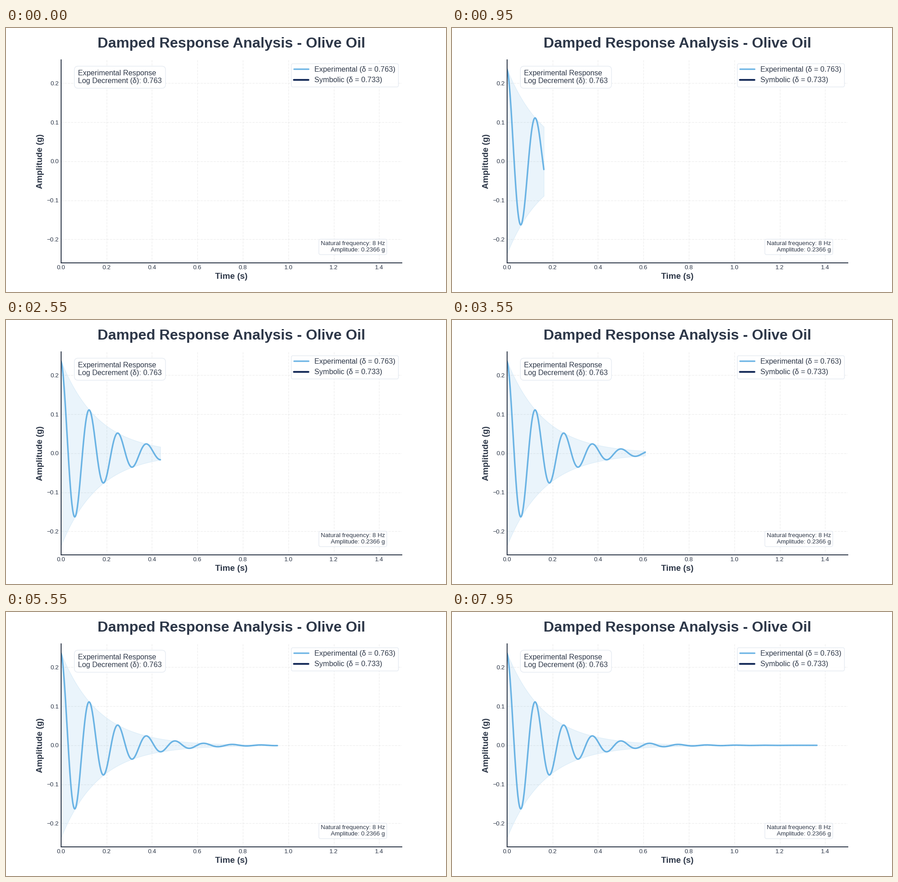
Animation, 966 px wide and 580 px high, one loop 8000 ms. Source, as a matplotlib script:

```python
import numpy as np
import matplotlib.pyplot as plt
from matplotlib.animation import FuncAnimation

W, H, DPI = 966, 580, 100
FRAMES, STEPS, INTERVAL = 160, 175, 50

INK, BORDER = "#2d3748", "#e2e8f0"
SKY, NAVY = "#3498db", "#1a2f5c"
AMP, FREQ, DEC, T_END, N = 0.2366, 8, 0.763, 1.5, 1000


def pt(size):
    """Points on a 10 inch wide layout."""
    return size * W / (10 * DPI)


plt.rcParams.update({
    "font.family": "Liberation Sans",
    "text.color": INK,
    "axes.labelcolor": INK,
    "axes.edgecolor": INK,
    "axes.linewidth": pt(1.5),
    "axes.axisbelow": True,
    "axes.labelpad": pt(4),
    "xtick.color": INK,
    "ytick.color": INK,
    "lines.solid_capstyle": "round",
    "patch.linewidth": pt(1),
})

# Damped oscillation from its logarithmic decrement
zeta = DEC / np.hypot(2 * np.pi, DEC)
wn = 2 * np.pi * FREQ
t = np.linspace(0, T_END, N)
env = AMP * np.exp(-zeta * wn * t)
wave = env * np.cos(wn * np.sqrt(1 - zeta ** 2) * t)

fig, ax = plt.subplots(figsize=(W / DPI, H / DPI), dpi=DPI, facecolor="white")
fig.subplots_adjust(left=0.125, right=0.9, bottom=0.11, top=0.88)
ax.set_xlim(0, T_END)
ax.set_ylim(-AMP * 1.1, AMP * 1.1)
ax.set_xticks(np.arange(0, 1.5, 0.2))
ax.set_yticks(np.arange(-2, 3) / 10)
ax.grid(True, ls="--", lw=pt(1), color="#cccccc", alpha=0.3)
ax.tick_params(length=0, pad=pt(3.5), labelsize=pt(10))
ax.spines[["top", "right"]].set_visible(False)

ax.set_title("Damped Response Analysis - Olive Oil", fontsize=pt(24),
             fontweight="bold", pad=pt(20))
ax.set_xlabel("Time (s)", fontsize=pt(14), fontweight="bold")
ax.set_ylabel("Amplitude (g)", fontsize=pt(14), fontweight="bold")


def note(x, y, text, size, pad, ha, va):
    ax.text(x, y, text, fontsize=pt(size), ha=ha, va=va, transform=ax.transAxes,
            bbox=dict(boxstyle=f"round,pad={pad}", fc="white", ec=BORDER,
                      lw=pt(1), alpha=0.9))


note(0.05, 0.95, "Experimental Response\nLog Decrement (δ): 0.763",
     12, 0.5, "left", "top")
note(0.95, 0.05, "Natural frequency: 8 Hz\nAmplitude: 0.2366 g",
     10, 0.3, "right", "bottom")

line, = ax.plot([], [], color=SKY, lw=pt(2.5), alpha=0.7,
                label="Experimental (δ = 0.763)")
ax.plot([], [], color=NAVY, lw=pt(3), label="Symbolic (δ = 0.733)")
ax.legend(loc="upper right", fontsize=pt(12), frameon=True, facecolor="white",
          edgecolor=BORDER, framealpha=0.9)
band = ax.fill_between(t[:1], -env[:1], env[:1], color=SKY, alpha=0.1,
                       lw=pt(1))


def draw(frame):
    n = frame * N // STEPS + 1
    x, e = t[:n], env[:n]
    line.set_data(x, wave[:n])
    upper, lower = np.column_stack([x, e]), np.column_stack([x, -e])
    band.set_verts([np.vstack([upper, lower[::-1]])])
    return band, line


anim = FuncAnimation(fig, draw, frames=FRAMES, interval=INTERVAL,
                     repeat=True, repeat_delay=0, blit=False)
plt.show()
```
